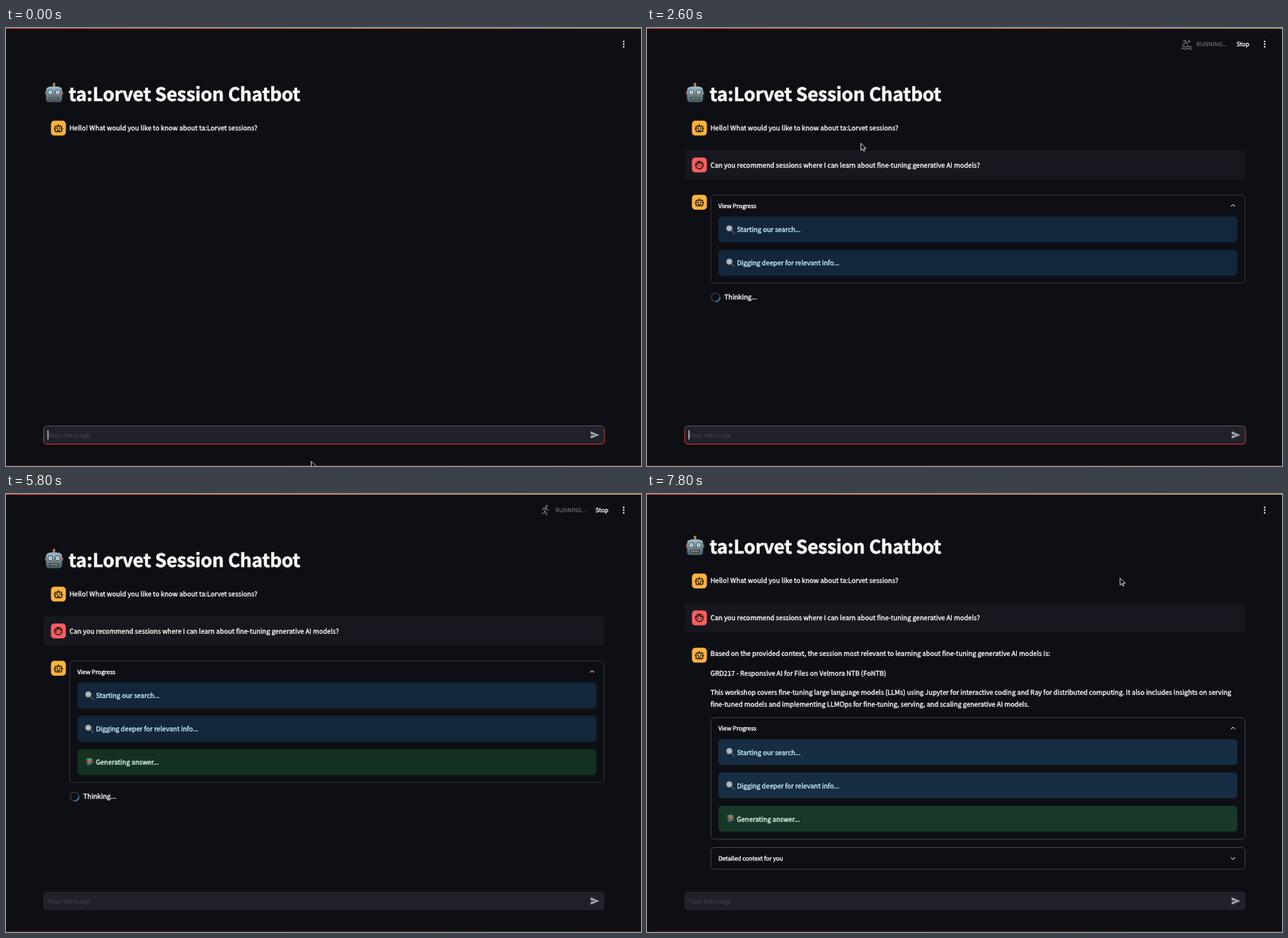
Animation of 800 by 552 pixels, one loop 8000 ms. Source, as an HTML page:

```html
<!DOCTYPE html>
<html lang="en">
<head>
<meta charset="utf-8">
<title>Session Chatbot</title>
<style>
  html, body { margin: 0; width: 100%; height: 100%; overflow: hidden; background: #0e0f14; }
  svg { display: block; width: 100vw; height: 100vh; }
  text {
    font: 8.36px "Noto Sans CJK JP", "Noto Sans CJK SC", "Noto Sans CJK", "Open Sans", sans-serif;
    fill: #fafafa; stroke: #fafafa; stroke-width: .32px;
    text-rendering: geometricPrecision; white-space: pre;
  }
  .title { font-size: 23.25px; font-weight: 700; letter-spacing: -.005em; stroke-width: .55px; }
  .small { font-size: 7.38px; }
  .muted { fill: #85868c; stroke: none; }
  .placeholder { fill: #45464e; stroke: none; }
  .line { fill: none; stroke: #fafafa; stroke-width: 1; }
  .ink { fill: none; stroke: #17130c; stroke-width: 1.25; }
  .frame { fill: none; stroke: #2e3036; }
  .info { fill: #14263a; }
  .success { fill: #143122; }
  .info + use + text { fill: #c7ebff; stroke: #c7ebff; }
  .success + use + text { fill: #dffde9; stroke: #dffde9; }
  .fresh .info { fill: #172d43; }
  .fresh .success { fill: #173828; }
  .fresh .frame { stroke: #3b3d43; }
  .sport { fill: none; stroke: #74767c; stroke-width: 1.9; }
  .sport circle.head { fill: #74767c; stroke: none; }
</style>
</head>
<body>
<svg viewBox="0 0 800 552" preserveAspectRatio="none">
  <defs>
    <linearGradient id="rainbow">
      <stop stop-color="#d23a33"/><stop offset=".5" stop-color="#cf6a2e"/><stop offset="1" stop-color="#b5902f"/>
    </linearGradient>
    <linearGradient id="focus" x2="0" y2="1">
      <stop stop-color="#5c4a50"/><stop offset=".3" stop-color="#a02f30"/><stop offset="1" stop-color="#d32a28"/>
    </linearGradient>
    <linearGradient id="metal" x2="0" y2="1">
      <stop stop-color="#a3bcc8"/><stop offset="1" stop-color="#415a66"/>
    </linearGradient>
    <g id="bot">
      <rect width="18.8" height="18.8" rx="4.4" fill="#fdb23c"/>
      <rect x="5.2" y="6.7" width="8.4" height="7.2" rx="1.2" class="ink"/>
      <path class="ink" d="M9.4 6.7V4.4M5 10H3.6M13.8 10h1.4M7.4 12h4"/>
      <circle cx="7.7" cy="9.4" r=".9"/><circle cx="11.1" cy="9.4" r=".9"/>
    </g>
    <g id="person">
      <rect width="18.8" height="18.8" rx="4.4" fill="#fb5d5d"/>
      <circle cx="9.4" cy="9.4" r="4.7" class="ink"/>
      <path class="ink" d="M4.9 9q3-.6 4-3.6 2 3 5 2.6"/>
      <circle cx="7.6" cy="10.6" r=".7"/><circle cx="11.2" cy="10.6" r=".7"/>
    </g>
    <g id="robot">
      <path d="M12 7V3" stroke="#9aaeb6" stroke-width="2"/>
      <circle cx="12" cy="2.2" r="1.8" fill="#c9783f"/>
      <rect x=".4" y="11" width="23.200" height="5" rx="2" fill="#a8483d"/>
      <path d="M2 9q0-4 10-4t10 4v12q0 4-4 4H6q-4 0-4-4z" fill="url(#metal)"/>
      <g fill="#dcecef" stroke="#3d545e"><circle cx="7.4" cy="12.4" r="3"/><circle cx="16.6" cy="12.4" r="3"/></g>
      <circle cx="7.4" cy="12.4" r="1.1" fill="#5a8fa6"/><circle cx="16.6" cy="12.4" r="1.1" fill="#5a8fa6"/>
      <path d="M12 14l1.6 3h-3.2z" fill="#c0503f"/>
      <rect x="6" y="18.6" width="12" height="3.6" rx="1.4" fill="#2d3b42"/>
      <path d="M7.5 20.4h9" stroke="#d9b26a" stroke-width="1.6" stroke-dasharray="1.6 .8"/>
    </g>
    <g id="lens">
      <path d="M6.5 6.5l4 4" stroke="#4c4e54" stroke-width="1.8" stroke-linecap="round"/>
      <circle cx="4.3" cy="4.3" r="3.6" fill="#aebcc4" stroke="#84878e"/>
    </g>
    <g id="books">
      <path d="M1 1.6l6-1.2 2.6 1.8-6 1.4z" fill="#4a9a5c"/>
      <path d="M.8 4.4l7-1.4 2.2 1.6-6.2 1.6z" fill="#c9504a"/>
      <path d="M1.4 7.4l6-1.6 3 1.6L4 9.8z" fill="#3f7188"/>
      <path d="M3.6 4l6-1.4M4 6.8l6-1.6" stroke="#b9b2a4" stroke-width=".6"/>
    </g>
    <path id="wave" d="M1 0q2.75-2.6 5.5 0t5.5 0 5.5 0 5.5 0"/>
  </defs>

  <rect width="800" height="552" fill="#0e0f14"/>
  <rect width="800" height="1" fill="url(#rainbow)"/>
  <rect y="551.2" width="800" height=".8" fill="url(#rainbow)" opacity=".3"/>

  <g id="running">
    <g id="sports" transform="translate(673 13.4) scale(.589)"></g>
    <text class="small muted" x="692" y="23.3">RUNNING...</text>
    <text class="small" x="742.8" y="23.3">Stop</text>
  </g>
  <g fill="#fafafa"><circle cx="778.2" cy="17.1" r="1.05"/><circle cx="778.2" cy="20.4" r="1.05"/><circle cx="778.2" cy="23.7" r="1.05"/></g>

  <g id="page">
    <use href="#robot" x="48.5" y="68.6"/>
    <text class="title" x="78.8" y="91.6">ta:Lorvet Session Chatbot</text>
    <use href="#bot" x="56.6" y="116.8"/>
    <text x="80" y="129.1">Hello! What would you like to know about ta:Lorvet sessions?</text>
    <g id="question">
      <rect x="47" y="154" width="707" height="37.2" rx="4.5" fill="#17181f"/>
      <use href="#person" x="56.6" y="163.3"/>
      <text x="80" y="175.7">Can you recommend sessions where I can learn about fine-tuning generative AI models?</text>
    </g>
    <use id="replyBot" href="#bot" x="56.6" y="210.3"/>
  </g>

  <g id="answer">
    <text x="80" y="204.3">Based on the provided context, the session most relevant to learning about fine-tuning generative AI models is:</text>
    <text x="80" y="228.7">GRD217 - Responsive AI for Files on Velmora NTB (FoNTB)</text>
    <text x="80" y="252.8">This workshop covers fine-tuning large language models (LLMs) using Jupyter for interactive coding and Ray for distributed computing. It also includes insights on serving</text>
    <text x="80" y="267.8">fine-tuned models and implementing LLMOps for fine-tuning, serving, and scaling generative AI models.</text>
  </g>

  <g id="progress">
    <rect id="panel" class="frame" x="80.5" y="210.5" width="673" rx="4.5"/>
    <text class="small" x="90" y="227">View Progress</text>
    <path class="line" d="M735.7 225l2.6-2.6 2.6 2.6"/>
    <g id="steps"></g>
  </g>

  <g id="thinking">
    <circle cx="86.4" r="5.4" fill="none" stroke="#34363d" stroke-width="1.5"/>
    <path id="arc" d="M5.4 0A5.4 5.4 0 0 1 0 5.4" fill="none" stroke="#3a86cc" stroke-width="1.5"/>
    <text x="97.6" y="3">Thinking...</text>
  </g>

  <g id="details" class="fresh">
    <rect class="frame" x="80.5" y="445.5" width="673" height="27.5" rx="4.5"/>
    <text class="small" x="90" y="462.3">Detailed context for you</text>
    <path class="line" d="M735.7 458l2.6 2.6 2.6-2.6"/>
  </g>

  <rect x="47" y="501" width="707" height="23.6" rx="4.8" fill="#20212a"/>
  <rect id="focusRing" x="47.5" y="501.5" width="706.5" height="23" rx="4.6" fill="none" stroke="url(#focus)" stroke-width="1.1"/>
  <text id="placeholder" class="placeholder" x="52.6" y="515.9">Your message</text>
  <text id="draft" x="52.6" y="515.9">Can you recommend sessions where I can learn about fine-tuning generative AI models?</text>
  <rect id="caret" x="52.4" y="507" width="1" height="11.6" fill="#fafafa"/>
  <path d="M736.6 508.3l11 4.6-11 4.6v-3.7l7-.9-7-.9z" fill="#a5a6ac"/>

  <path id="mouse" d="M0 0v9l2-1.9 1.5 3.1 1.4-.6L3.500 6.500h3z" fill="#050505" stroke="#f2f2f2" stroke-width=".8"/>
</svg>

<script>
  const LOOP = 8000, TICK = 200, SCROLL = -16.6;
  const el = id => document.getElementById(id);
  const show = (id, on) => { el(id).style.display = on ? "" : "none"; };
  const shift = (id, x, y) => el(id).setAttribute("transform", `translate(${x} ${y})`);
  const between = (t, from, to) => t >= from && t < to;

  // Progress messages: style, icon, text, time of arrival
  const steps = [
    ["info", "lens", "Starting our search...", 800],
    ["info", "lens", "Digging deeper for relevant info...", 1800],
    ["success", "books", "Generating answer...", 3000],
  ];
  el("steps").innerHTML = steps.map(([kind, icon, label], i) => `
    <g id="step${i}" transform="translate(0 ${i * 42})">
      <rect class="${kind}" x="90" y="237.6" width="653.8" height="32.6" rx="4.6"/>
      <use href="#${icon}" x="99.4" y="248.2"/>
      <text x="113.2" y="257.2">${label}</text>
    </g>`).join("");

  const head = (x, y) => `<circle class="head" cx="${x}" cy="${y}" r="2.3"/>`;
  const waves = `<use href="#wave" y="17"/><use href="#wave" y="21.5"/>`;
  const sports = {
    run: head(13.5, 3.5) + `<path d="M5.500 12V8.500l5-2 2.500 1 2 3.500 4 1M11.500 7l-2 7 4 3v6M9.500 15l-1 4-5-1"/>`,
    swim: head(17, 6) + `<path d="M4 5.500l5-1.500 5 8.500M10 7l-6 6"/>` + waves,
    wheel: head(16, 4) + `<path d="M7 10l4-3 3 1.500-2.500 5H17l-1 6M8 13a5 5 0 1 0 6 6"/>`,
    bike: head(15.5, 4) + `<circle cx="5" cy="17" r="4"/><circle cx="19" cy="17" r="4"/><path d="M12 19v-5l-3-3 4-4 2 3h4"/>`,
    row: head(12, 5) + `<path d="M4 4l15 13M12 9l-4 5h9"/>` + waves,
  };
  el("sports").innerHTML = Object.entries(sports)
    .map(([name, art]) => `<g id="${name}" class="sport">${art}</g>`).join("");
  const sportOrder = ["bike", "row", "swim", "row", "wheel", "run", "bike", "run"];

  // Pointer trips: [time, x, y]
  const trips = [
    [[0, 384.5, 546], [0, 384.5, 546]],
    [[2200, 297, 2], [2600, 269.5, 145.2], [3400, 260, 162.2], [4000, 4, 2]],
    [[7200, 790, 542], [7600, 650, 190], [7800, 596, 105.8]],
  ];

  function pointerAt(t) {
    const trip = trips.find(p => between(t, p[0][0], p[p.length - 1][0] + TICK));
    if (!trip) return null;
    const next = trip.findIndex((p, i) => i && p[0] >= t);
    const [t0, x0, y0] = trip[next - 1], [t1, x1, y1] = trip[next];
    const k = t1 > t0 ? (t - t0) / (t1 - t0) : 0;
    return [x0 + (x1 - x0) * k, y0 + (y1 - y0) * k];
  }

  function draw(t) {
    const answered = t >= 7200, done = t >= 7400, asked = t >= 600;
    const count = steps.filter(s => t >= s[3]).length;
    const drafting = between(t, 200, 600);
    const focused = t < 4000;

    shift("page", 0, answered ? SCROLL : 0);
    show("question", asked);
    show("replyBot", count);
    show("answer", answered);
    show("details", done);

    show("progress", count);
    shift("progress", 0, answered ? 71.4 : 0);
    el("progress").classList.toggle("fresh", done);
    el("panel").setAttribute("height", 27.2 + 42 * count);
    steps.forEach((_, i) => show("step" + i, i < count));

    show("thinking", count > 1 && !answered);
    shift("thinking", 0, 255.4 + 42 * count);
    el("arc").setAttribute("transform", `translate(86.4 0) rotate(${(t - 200) / 800 * 360})`);

    show("running", asked && !done);
    const sport = sportOrder[Math.floor(t % 2000 / 250)];
    Object.keys(sports).forEach(name => show(name, name === sport));

    show("focusRing", focused);
    show("draft", drafting);
    show("placeholder", !drafting);
    show("caret", focused && (t === 0 || asked && t % 1000 >= 500));

    const pointer = pointerAt(t);
    show("mouse", pointer);
    if (pointer) shift("mouse", ...pointer);
  }

  function frame() {
    const t = performance.now() % LOOP;
    draw(Math.floor(t / TICK) * TICK);
    requestAnimationFrame(frame);
  }
  frame();
</script>
</body>
</html>
```
